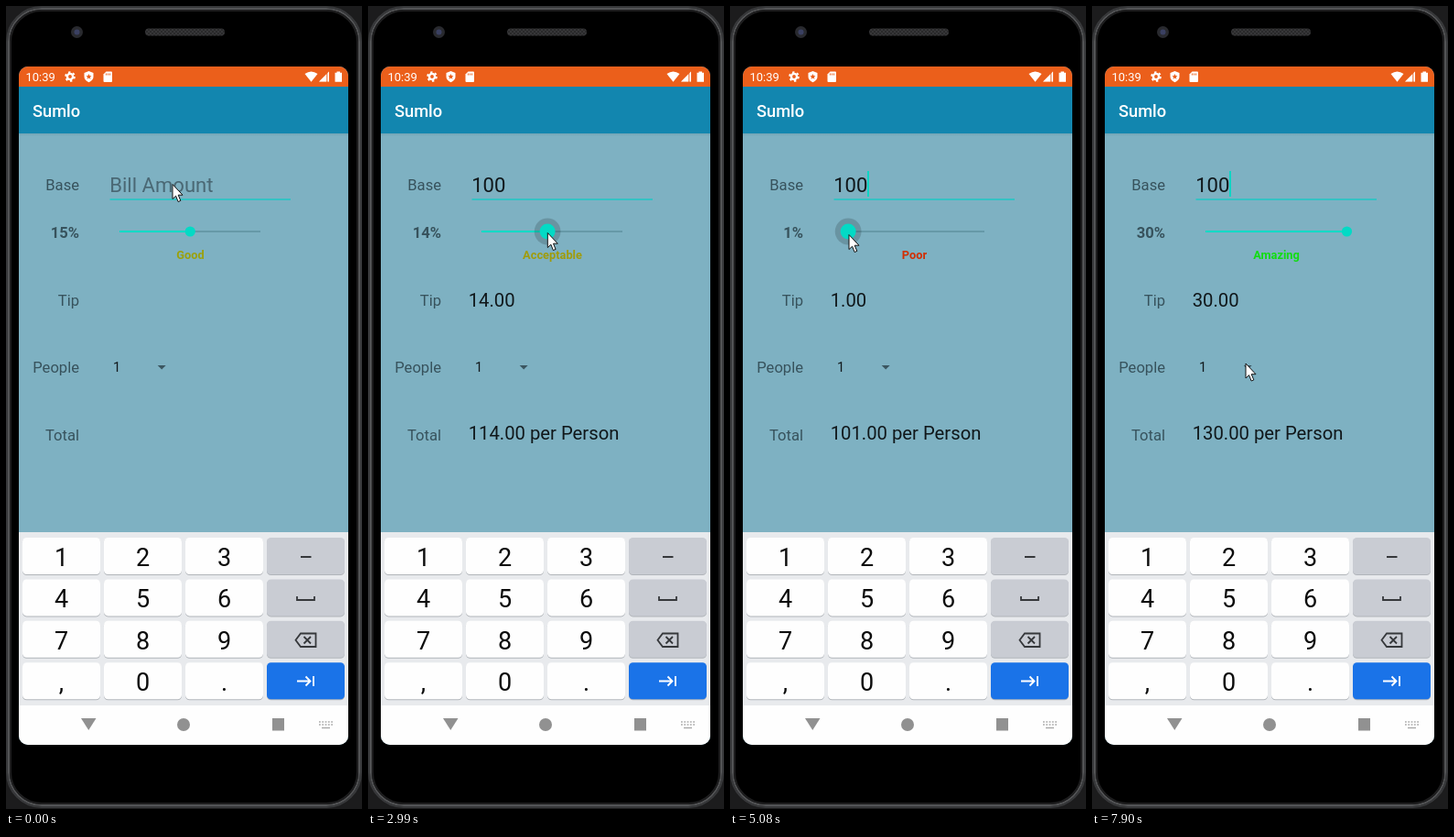
An HTML page for the animation above (8 s loop, 389 px wide and 876 px high).

```html
<!DOCTYPE html>
<html lang="en">
<head>
<meta charset="utf-8">
<title>Tip calculator</title>
<style>
html, body { margin: 0; width: 100%; height: 100%; overflow: hidden; background: #1c1c1d; }
svg { display: block; width: 100vw; height: 100vh; }
text { font-family: Roboto, sans-serif; white-space: pre; }
.label { font-size: 16.6px; fill: #37525c; text-anchor: end; }
.value { font-size: 20.25px; fill: #10171a; }
.bill { font-size: 22.1px; }
.key { font-size: 27px; fill: #0c0c0c; text-anchor: middle; }
.bold { font-weight: 700; }
</style>
</head>
<body>
<svg viewBox="0 0 389 876">
  <defs>
    <clipPath id="screen"><rect x="14" y="66" width="360" height="740" rx="10"/></clipPath>
    <pattern id="mesh" width="4" height="4" patternUnits="userSpaceOnUse">
      <rect width="4" height="4" fill="#29292a"/><path d="M0 4L4 0M0 0L4 4" stroke="#3b3b3c" stroke-width=".8"/>
    </pattern>
    <linearGradient id="shade" x2="0" y2="1"><stop stop-color="#72a4b5"/><stop offset="1" stop-color="#7eb1c2"/></linearGradient>
  </defs>

  <!-- phone body -->
  <rect width="389" height="876" fill="#1c1c1d"/>
  <rect x="1" y="1" width="387" height="873" rx="38" fill="#000" stroke="#38393b" stroke-width="2"/>
  <rect x="3" y="3" width="383" height="869" rx="36" fill="none" stroke="#535456" stroke-width="2"/>
  <rect x="5" y="5" width="379" height="865" rx="34" fill="none" stroke="#1e1e1f" stroke-width="2"/>
  <circle cx="77.5" cy="28.5" r="6.5" fill="#292a2f"/><circle cx="77.5" cy="28.5" r="3" fill="#3a4062"/>
  <rect x="152" y="24.5" width="87" height="8" rx="4" fill="url(#mesh)"/>

  <g clip-path="url(#screen)">
    <rect x="14" y="66" width="360" height="740" fill="#7eb1c2"/>
    <rect x="14" y="139" width="360" height="3" fill="url(#shade)"/>
    <rect x="14" y="66" width="360" height="22" fill="#eb5f1b"/>
    <rect x="14" y="88" width="360" height="51" fill="#1286af"/>
    <rect x="14" y="574" width="360" height="189" fill="#e8eaed"/>
    <rect x="14" y="763" width="360" height="43" fill="#fefefe"/>
  </g>

  <!-- status bar -->
  <g fill="#fff">
    <text x="21.5" y="82" font-size="13">10:39</text>
    <g fill="none" stroke="#fff">
      <circle cx="70" cy="77" r="3.1" stroke-width="2.4"/>
      <circle cx="70" cy="77" r="4.9" stroke-width="1.8" stroke-dasharray="2.4 2.73"/>
    </g>
    <path d="M90.5 71l5 2v4q0 4-5 6.2q-5-2.2-5-6.2v-4Z"/>
    <path d="M90.5 74l.9 2 2.1.2-1.6 1.4.5 2.1-1.9-1.1-1.9 1.1.5-2.1-1.6-1.4 2.1-.2Z" fill="#eb5f1b"/>
    <path d="M109.500 71.500h5.500q1 0 1 1v9.500q0 1-1 1h-7.500q-1 0-1-1v-7.500Z"/>
    <path d="M109.500 73.500v2M111.500 73.500v2M113.500 73.500v2" stroke="#eb5f1b"/>
    <path d="M326.5 74q7-5 14 0l-7 8.7Z"/>
    <path d="M353 71.5v11h-11Z" fill-opacity=".35"/><path d="M350 74.5v8h-8ZM351.5 73l1.5-1.5v11h-1.5Z"/>
    <path d="M361.5 71.5h3.5v1.3h2v10h-7.5v-10h2Z"/>
    <text x="29" y="121" font-size="18.3" font-weight="500">Sumlo</text>
  </g>

  <!-- form -->
  <g class="label">
    <text x="80" y="201">Base</text>
    <text id="percent" class="bold" x="80" y="253"></text>
    <text x="80" y="326.5">Tip</text>
    <text x="80" y="400">People</text>
    <text x="80" y="474">Total</text>
  </g>
  <path d="M113.5 210.9H311" stroke="#1cc9c4" stroke-width="1.5"/>
  <text id="bill" class="value bill" x="113.2" y="203"></text>
  <rect id="caret" y="180" width="1.8" height="28" fill="#03dac5"/>
  <path d="M124 246H278" stroke="#6699a8" stroke-width="1.8"/>
  <path id="track" stroke="#03dac5" stroke-width="2"/>
  <circle id="halo" cy="246" r="14.4" fill-opacity=".16"/>
  <circle id="thumb" cy="246" fill="#03dac5"/>
  <text id="rating" class="bold" x="201.5" y="276" font-size="12.8" text-anchor="middle"></text>
  <text id="tip" class="value" x="109.7" y="328"></text>
  <text x="117" y="399" font-size="14.6" fill="#10171a">1</text>
  <path d="M165.7 392h9l-4.5 4.5Z" fill="#3b5660"/>
  <text id="total" class="value" x="109.7" y="473"></text>

  <g id="keys"></g>
  <g fill="none" stroke="#36383b" stroke-width="1.8">
    <path d="M322 601H333.5M318 644v4h19v-4"/>
    <path d="M322 684.5h16.5v14.5H322l-5.5-7.25ZM325.5 688l7.5 7.5M333 688l-7.5 7.5"/>
    <path d="M318 736.5h14M327.5 731.5l5 5-5 5M336 731v11" stroke="#fff"/>
  </g>

  <!-- navigation bar -->
  <g fill="#919191">
    <path d="M82 777h16.5l-8.25 13Z"/>
    <circle cx="194" cy="784" r="7"/>
    <rect x="291" y="777" width="13" height="13.5"/>
    <path d="M342 781H357M342 784H357" stroke="#aaa" stroke-width="1.6" stroke-dasharray="1.8 1.5"/>
    <path d="M345 787.5H354" stroke="#aaa" stroke-width="1.4"/>
  </g>

  <path id="cursor" d="M.5.5V16.5L4.1 13.2 6.6 19.5 9.3 18.4 6.7 12.2H11.5Z" fill="#fff" stroke="#111"/>
</svg>
<script>
const $ = id => document.getElementById(id);
const set = (id, attrs) => { for (const k in attrs) $(id).setAttribute(k, attrs[k]); };

// keypad
const keyColor = (row, col) => col < 3 ? "#fefefe" : row < 3 ? "#c9ccd3" : "#1a73e8";
["123", "456", "789", ",0."].forEach((chars, row) => {
  for (let col = 0; col < 4; col++) {
    const x = 18 + col * 89, y = 580 + row * 45.4, fill = keyColor(row, col);
    const box = (dy, color) => `<rect x="${x}" y="${y + dy}" width="85" height="40" rx="4.5" fill="${color}"/>`;
    $("keys").innerHTML += box(1, "#b1b5ba") + box(0, fill) +
      `<text class="key" x="${x + 42.5}" y="${y + 30.8}">${chars[col] || ""}</text>`;
  }
});

// bursts of screen updates: [start, count], spaced by STEP
const LOOP = 8000, STEP = 120;
const bursts = [[0, 1], [250, 1], [750, 2], [1120, 1], [1490, 6], [2380, 1], [2630, 7], [3470, 3], [3850, 3],
  [4240, 7], [5080, 1], [5330, 2], [5590, 7], [6430, 1], [6570, 4], [7300, 6]];
const typing = [[0, ""], [250, "1"], [870, "10"], [1120, "100"]];
// pointer path: [time, x, y]
const path = [[0, 181.5, 194], [1370, 181.5, 194], [1850, 215.5, 249], [2090, 203.5, 247], [2380, 203, 247],
  [2630, 203, 247], [2990, 195.8, 247], [3350, 178, 248], [3710, 172, 248], [4090, 157.5, 249],
  [4960, 131, 249], [5080, 129.5, 249], [5210, 129.5, 249], [5450, 141, 249], [6070, 205, 248],
  [6310, 226, 248], [6430, 241.5, 249], [6930, 293, 249], [7180, 293, 249], [7900, 167.5, 389.5]];
const PRESS = 2630, RELEASE = 7300, BLINK = 960;
const worst = [212, 0, 0], best = [16, 221, 16];

const lastBefore = (list, t) => list.filter(e => e[0] <= t).pop();

function snap(t) {
  const [start, count] = lastBefore(bursts, t);
  return start + STEP * Math.min(count - 1, Math.floor((t - start) / STEP));
}

function pointer(t) {
  const i = path.findIndex(p => p[0] > t);
  if (i < 0) return path[path.length - 1].slice(1);
  const a = path[i - 1], b = path[i], k = (t - a[0]) / (b[0] - a[0]);
  return [1, 2].map(j => a[j] + (b[j] - a[j]) * k);
}

function percentAt(t, x) {
  if (t < PRESS) return 15;
  return t > 6900 ? 30 : Math.max(0, Math.min(30, Math.floor((x - 123.5) / 5.15)));
}

function ratingColor(k) {
  const mix = (a, b) => Math.round((a ** 2.2 * (1 - k) + b ** 2.2 * k) ** (1 / 2.2));
  return `rgb(${worst.map((c, i) => mix(c, best[i]))})`;
}

function draw(now) {
  const t = snap(now % LOOP);
  const [x, y] = pointer(t);
  const percent = percentAt(t, x), thumbX = 124 + percent * 5.15;
  const held = t >= PRESS && t < RELEASE;
  const [typed, bill] = lastBefore(typing, t);
  const tip = bill * percent / 100;

  $("bill").textContent = bill || "Bill Amount";
  set("bill", { style: bill ? "" : "fill:#4a6874" });
  set("caret", {
    x: 113 + bill.length * 12.36,
    visibility: bill && (t - typed) % BLINK < BLINK / 2 ? "visible" : "hidden"
  });
  $("percent").textContent = percent + "%";
  $("tip").textContent = bill && tip.toFixed(2);
  $("total").textContent = bill && (+bill + tip).toFixed(2) + " per Person";
  $("rating").textContent = ["Poor", "Poor", "Acceptable", "Good", "Great", "Amazing", "Amazing"][Math.floor(percent / 5)];
  set("rating", { fill: ratingColor(percent / 30) });
  set("track", { d: `M124 246H${thumbX}` });
  set("thumb", { cx: thumbX, r: held ? 8.5 : 5.6 });
  set("halo", { cx: thumbX, visibility: held ? "visible" : "hidden" });
  set("cursor", { transform: `translate(${x} ${y})` });
}

const begin = performance.now();
function tick() {
  draw(performance.now() - begin);
  requestAnimationFrame(tick);
}
tick();
</script>
</body>
</html>
```
